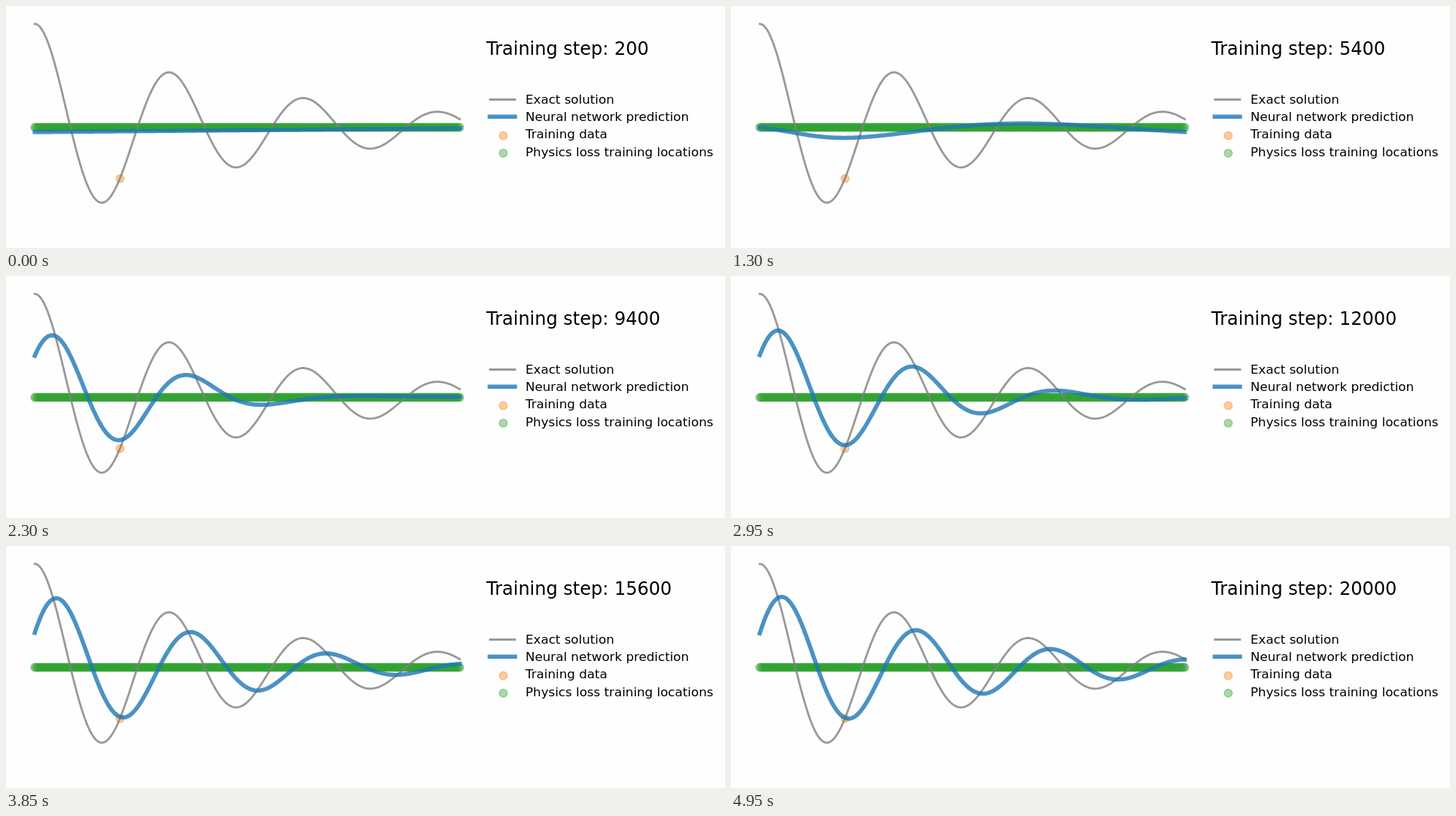
Animation of 955 by 322 pixels, one loop 5000 ms. Source, as an HTML page with a canvas:

```html
<!DOCTYPE html>
<html lang="en">
<head>
<meta charset="utf-8">
<style>
  html, body { margin: 0; width: 100%; height: 100%; overflow: hidden; background: #fefefe; }
  canvas { display: block; }
</style>
</head>
<body>
<canvas id="stage" width="955" height="322"></canvas>
<script>
const ctx = document.getElementById('stage').getContext('2d');
const LOOP = 5000, TICK = 50;
const X0 = 38.2, SPAN = 564.5, AXIS = 161.4, SCALE = 137.6;
const DAMPING = 2, FREQ = Math.sqrt(20 ** 2 - DAMPING ** 2);
const GRAY = 'rgba(128,128,128,.8)', BLUE = 'rgba(31,119,180,.8)';
const ORANGE = 'rgba(255,127,14,.4)', GREEN = 'rgba(44,160,44,.4)';

const { exp, cos, tanh, atan, min, max, PI } = Math;
const mix = (a, b, p) => a + (b - a) * p;
const smoothstep = (a, b, x) => {
  const p = min(1, max(0, (x - a) / (b - a)));
  return p * p * (3 - 2 * p);
};

// Damped oscillator released from rest at height 1
function exact(t) {
  const phase = atan(-DAMPING / FREQ);
  return SCALE * exp(-DAMPING * t) * cos(FREQ * t + phase) / cos(phase);
}

// First attempts: a slanted line that bends into a shallow wave
function roughFit(t, sec) {
  const bend = 1 - (1 - min(1, sec / 1.3)) ** 2;
  const line = -6.4 + 5.1 * t;
  const wave = -4.2 - 9.4 * cos(PI * (t - 0.2) * (2.37 - 1.1 * (t - 0.632)));
  return mix(line, wave, bend);
}

// Delayed oscillation that fades and slows beyond a reach growing with time
function learnedFit(t, sec) {
  const amplitude = 105.5 - 15.5 * exp(2.3 - sec);
  const delay = 0.051 + 0.0055 * tanh((sec - 3.25) / 0.5);
  const reach = 0.2 + 0.047 * sec ** 2;
  const beyond = (t / reach) ** 3.6;
  const angle = FREQ * (t - delay) - 0.36 * beyond;
  return amplitude * exp(-DAMPING * t) * cos(angle) / (1 + beyond);
}

const predicted = (t, sec) =>
  mix(roughFit(t, sec), learnedFit(t, sec), smoothstep(1.25, 1.8, sec));

const times = Array.from({ length: 301 }, (_, i) => i / 300);
const plot = f => times.map(t => [X0 + SPAN * t, AXIS - f(t)]);

function line(points, color, width) {
  ctx.beginPath();
  points.forEach(([x, y]) => ctx.lineTo(x, y));
  ctx.strokeStyle = color;
  ctx.lineWidth = width;
  ctx.lineCap = 'square';
  ctx.lineJoin = 'round';
  ctx.stroke();
}

function dot(x, y, color) {
  ctx.beginPath();
  ctx.arc(x, y, 5.3, 0, 2 * PI);
  ctx.fillStyle = ctx.strokeStyle = color;
  ctx.lineWidth = 1.39;
  ctx.fill();
  ctx.stroke();
}

function label(text, x, y, size) {
  ctx.font = `${size}px "DejaVu Sans", sans-serif`;
  ctx.fillStyle = '#000';
  ctx.fillText(text, x, y);
}

function drawLegend() {
  line([[643, 124.5], [676, 124.5]], GRAY, 2.78);
  line([[642.5, 147.2], [676, 147.2]], BLUE, 5.56);
  dot(660.5, 172.6, ORANGE);
  dot(660.5, 195.7, GREEN);
  ['Exact solution', 'Neural network prediction', 'Training data', 'Physics loss training locations']
    .forEach((text, i) => label(text, 690, Math.floor(130 + 23.4 * i), 16.7));
}

function draw(now) {
  const tick = Math.floor(now % LOOP / TICK), sec = tick * TICK / 1000;
  ctx.fillStyle = '#fefefe';
  ctx.fillRect(0, 0, 955, 322);
  dot(151.5, 229.5, ORANGE);
  plot(() => 0).forEach(([x, y]) => dot(x, y, GREEN));
  line(plot(exact), GRAY, 2.78);
  line(plot(t => predicted(t, sec)), BLUE, 5.56);
  drawLegend();
  label('Training step: ' + (tick + 1) * 200, 638, 65, 24);
}

const start = performance.now();
function loop() {
  draw(performance.now() - start);
  requestAnimationFrame(loop);
}
loop();
</script>
</body>
</html>
```
